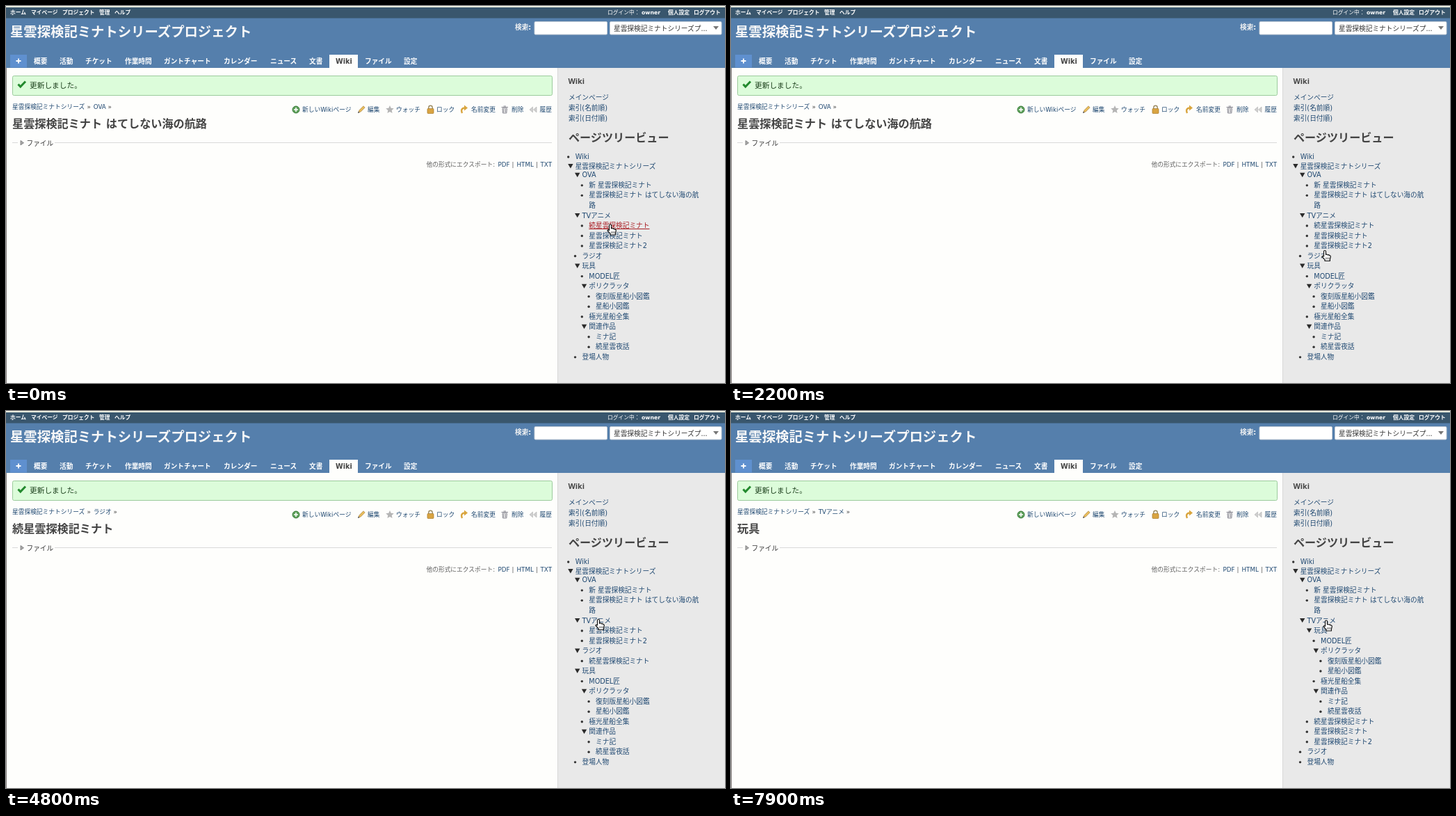
Recreate the animation shown at these times as an HTML page. Size 1034 by 542 pixels, loop 8 s.

```html
<!DOCTYPE html>
<html lang="ja">
<head>
<meta charset="utf-8">
<title>Wiki ページツリー</title>
<style>
html, body { margin: 0; width: 100%; height: 100%; overflow: hidden; background: #fefefc; }
svg { display: block; width: 1034px; height: 542px; }
text { font-family: "DejaVu Sans", "Noto Sans CJK JP", "Noto Sans CJK", sans-serif; white-space: pre; }
</style>
</head>
<body>
<svg id="stage" viewBox="0 0 1034 542"></svg>
<script>
const LOOP = 8000, STEP = 100;
const SERIES = "星雲探検記ミナト";
const SEQUEL = "続" + SERIES;
const LINK = "#1f4871", INK = "#444";
const stage = document.getElementById("stage");

function add(tag, attrs, parent = stage) {
  const node = document.createElementNS("http://www.w3.org/2000/svg", tag);
  for (const key in attrs) node.setAttribute(key, attrs[key]);
  parent.appendChild(node);
  return node;
}
const rect = (x, y, width, height, fill, more) => add("rect", { x, y, width, height, fill, ...more });
const path = (d, more, parent) => add("path", { d, fill: "none", ...more }, parent);

// Places a line of text by its left edge and the visual middle of its glyphs.
function label(x, middle, content, size, fill, more, parent) {
  const node = add("text", { x, y: middle + size * 0.37, "font-size": size, fill, ...more }, parent);
  node.textContent = content;
  return node;
}
const bold = { "font-weight": 700 };

function drawHeader() {
  rect(0, 0, 1034, 2, "#e9ecdf");
  rect(0, 2, 1034, 16, "#39566d");
  rect(0, 17.5, 1034, 71.5, "#557fac");
  const menu = [[6, "ホーム"], [36, "マイページ"], [81, "プロジェクト"], [134, "管理"], [156, "ヘルプ"],
    [914, "owner"], [952, "個人設定"], [989, "ログアウト"]];
  for (const [x, name] of menu) label(x, 9, name, 7.75, "#fff", bold);
  label(865, 9, "ログイン中：", 7.75, "#fff");
  label(6, 37, SERIES + "シリーズプロジェクト", 19.35, "#f8f8f8", bold);

  label(732, 30.5, "検索:", 9.7, "#f4f4f4", bold);
  rect(760, 22.5, 104.5, 18.5, "#fff", { stroke: "#c4cdd6", rx: 1.5 });
  rect(868.5, 22.5, 160.5, 18.5, "#fff", { stroke: "#c4cdd6", rx: 1.5 });
  label(874, 32.5, SERIES + "シリーズプ...", 9.7, "#333");
  path("M1017 29h8l-4 5z", { fill: "#777" });

  rect(6, 70, 24, 18.5, "#5f90cf");
  path("M14.5 79h7M18 75.5v7", { stroke: "#fff", "stroke-width": 1.8 });
  rect(465, 70, 41, 19, "#fefefc");
  const tabs = [[40, "概要"], [77, "活動"], [114, "チケット"], [171, "作業時間"], [227, "ガントチャート"],
    [313, "カレンダー"], [380, "ニュース"], [436, "文書"], [474, "Wiki"], [516, "ファイル"], [572, "設定"]];
  for (const [x, name] of tabs) label(x, 79, name, 9.7, name === "Wiki" ? "#444" : "#fff", bold);
}

function drawIcons() {
  add("circle", { cx: 417, cy: 149, r: 5, fill: "#5da05a", stroke: "#3f7f3f" });
  path("M414 149h6M417 146v6", { stroke: "#fff", "stroke-width": 1.6 });
  path("M507 153l1-3.2 6-6 2.2 2.2-6 6z", { fill: "#e9bd5c", stroke: "#a98545", "stroke-width": .7 });
  path("M506 154l2.5-.8-1.7-1.7z", { fill: "#444" });
  path("M552 143l1.7 3.8 4.1.4-3.1 2.7.9 4.1-3.6-2.1-3.6 2.1.9-4.1-3.1-2.7 4.1-.4z", { fill: "#b5b5b5" });
  path("M607.8 148v-2a2.7 2.7 0 0 1 5.4 0v2", { stroke: "#9a8a60", "stroke-width": 1.4 });
  rect(606, 147.5, 9, 7, "#d9a441", { stroke: "#a87a2a", "stroke-width": .7, rx: 1 });
  path("M656 154q-3-7 4-7.5", { stroke: "#d9a53e", "stroke-width": 2.4 });
  path("M659 142.5l5 4-5 4z", { fill: "#d9a53e" });
  path("M714 147l.6 7h5.2l.6-7zM712.5 145.5h9.5M715.5 144h3.5M716 148v5M718.4 148v5",
    { stroke: "#85858f", "stroke-width": 1 });
  path("M757.5 145v8l-4.5-4zM763 145v8l-4.5-4z", { fill: "#cfcfcf", stroke: "#b0b0b0", "stroke-width": .6 });
}

function drawContent() {
  rect(0, 89, 1, 453, "#85807e");
  rect(9.5, 100.5, 776, 28, "#dcfcda", { stroke: "#9ccb9c", rx: 2 });
  path("M17.5 112.5l3.3 3.5 7.2-7.5", { stroke: "#238a2e", "stroke-width": 3 });
  label(34, 114, "更新しました。", 10.7, "#1d401d");

  label(9, 145, SERIES + "シリーズ", 8.73, LINK);
  label(116.5, 145, "»", 8.73, INK);

  drawIcons();
  const actions = [[426, "新しいWikiページ"], [520, "編集"], [561, "ウォッチ"], [619, "ロック"],
    [669, "名前変更"], [727, "削除"], [767.5, "履歴"]];
  for (const [x, name] of actions) label(x, 149, name, 8.73, LINK);

  path("M9 196.5h8M70 196.5h715", { stroke: "#d9d9d9" });
  path("M21 193.5l4.5 3.2-4.5 3.2z", { fill: "#aaa", stroke: "#777", "stroke-width": .8 });
  label(29.5, 197, "ファイル", 9.7, "#333");

  label(604.5, 228, "他の形式にエクスポート:", 8.73, "#606060");
  for (const x of [727.5, 762]) label(x, 228, "|", 8.73, "#555");
  for (const [x, name] of [[707.5, "PDF"], [734.5, "HTML"], [768.5, "TXT"]]) label(x, 228, name, 8.73, LINK);
}

function drawSidebar() {
  rect(793, 89, 241, 453, "#e9e9e9");
  rect(793, 89, 1, 453, "#d8d8d8");
  label(808.5, 108.5, "Wiki", 10.7, INK, { style: "font-family:'Open Sans',sans-serif;font-weight:700" });
  label(809, 131.5, "メインページ", 9.7, LINK);
  label(809, 146.5, "索引(名前順)", 9.7, LINK);
  label(809, 161, "索引(日付順)", 9.7, LINK);
  label(809, 189.5, "ページツリービュー", 16.1, INK, bold);
}

// A page is either a name or [name, children]; a line break splits a long name.
const toys = ["玩具", [
  "MODEL匠",
  ["ポリクラッタ", ["復刻版星船小図鑑", "星船小図鑑"]],
  "極光星船全集",
  ["関連作品", ["ミナ記", "続星雲夜話"]]
]];
const series = [SERIES, SERIES + "2"];
const wikiTree = (...groups) => ["Wiki", [SERIES + "シリーズ", [
  ["OVA", ["新 " + SERIES, SERIES + " はてしない海の航\n路"]],
  ...groups, "登場人物"
]]];

const rowY = row => row < 2 ? [216.5, 230][row] : 242.8 + 14.53 * (row - 2);

function buildTree(pages) {
  const group = add("g", {});
  const links = {};
  let row = 0;
  const walk = (list, depth) => {
    for (const page of list) {
      const [name, children] = Array.isArray(page) ? page : [page];
      const x = 818.7 + 9.8 * depth, y = rowY(row);
      if (children) path(`M${x - 10.5} ${y - 3}h7.4l-3.7 6.4z`, { fill: "#2b2b2b" }, group);
      else add("circle", { cx: x - 10, cy: y + .5, r: 1.7, fill: "#333" }, group);
      for (const line of name.split("\n")) links[name] = label(x, rowY(row++), line, 9.7, LINK, {}, group);
      if (children) walk(children, depth + 1);
    }
  };
  walk(pages, 0);
  return { group, links };
}

drawHeader();
drawContent();
drawSidebar();

const trees = {
  first: buildTree(wikiTree(["TVアニメ", [SEQUEL, ...series]], "ラジオ", toys)),
  radio: buildTree(wikiTree(["TVアニメ", series], ["ラジオ", [SEQUEL]], toys)),
  nested: buildTree(wikiTree(["TVアニメ", [toys, SEQUEL, ...series]], "ラジオ"))
};
const crumb = label(125.7, 145, "", 8.73, LINK);
const crumbName = add("tspan", {}, crumb);
add("tspan", { fill: INK }, crumb).textContent = " »";
const heading = label(9, 169, "", 16.15, INK, bold);

const ghost = label(0, 0, "", 9.7, "#c5282b", { "text-decoration": "underline", opacity: .85 });
const hand = add("g", {});
path("M-1.5 1a1.5 1.5 0 0 1 3 0V5.5Q3 4.3 4.2 6Q5.7 5 6.5 6.7Q8.2 6.2 8.3 8.3L7.4 12V14.5H0V12.7L-4 8.5Q-3.6 6.4-1.5 8Z",
  { fill: "#fff", stroke: "#111", "stroke-width": 1.2, "stroke-linejoin": "round" }, hand);
path("M1.8 9.5v3M3.8 9.5v3M5.8 9.5v3", { stroke: "#222", "stroke-width": .7 }, hand);
const arrow = add("g", {});
path("M0 0V11.5L2.7 9L4.6 13L6.6 12.1L4.8 8.2H8.3Z",
  { fill: "#111", stroke: "#fff", "stroke-width": .9 }, arrow);
add("circle", { cx: 7.8, cy: 18, r: 7.2, fill: "#27962b", stroke: "#1c7a22", "stroke-width": .8 }, arrow);
path("M3.8 18h8M7.8 14v8", { stroke: "#fff", "stroke-width": 2.2 }, arrow);

const pages = [
  { at: 0, tree: "first", crumb: "OVA", title: SERIES + " はてしない海の航路" },
  { at: 2400, tree: "radio", crumb: "ラジオ", title: SEQUEL },
  { at: 5100, tree: "first", crumb: "TVアニメ", title: SEQUEL },
  { at: 7500, tree: "nested", crumb: "TVアニメ", title: "玩具" }
];
const drags = [
  { hover: 0, from: 600, to: 1700, name: SEQUEL, dx: -27.5, dy: 6.5 },
  { hover: 2600, from: 3600, to: 4600, name: SEQUEL, dx: -16, dy: 5 },
  { hover: 5400, from: 5600, to: 7100, name: "玩具", dx: -9, dy: 2 }
];
const pointer = [[0, 869, 314.5], [500, 869, 314.5], [1300, 851.5, 355], [1700, 854, 352], [3500, 854, 352],
  [4500, 852, 300], [5000, 852, 300], [5500, 837, 371], [6000, 866, 334], [6800, 856.5, 301.5], [8000, 856, 301.5]];

function pointerAt(t) {
  const i = pointer.findIndex(key => key[0] > t);
  const [t0, x0, y0] = pointer[i - 1], [t1, x1, y1] = pointer[i];
  const u = (t - t0) / (t1 - t0), e = u * u * (3 - 2 * u);
  return [x0 + (x1 - x0) * e, y0 + (y1 - y0) * e];
}
const show = (node, visible) => node.setAttribute("visibility", visible ? "visible" : "hidden");

function render(t) {
  const page = pages.filter(p => p.at <= t).pop();
  crumbName.textContent = page.crumb;
  heading.textContent = page.title;
  for (const key in trees) show(trees[key].group, key === page.tree);

  const drag = drags.find(d => t >= d.hover && t < d.to);
  const links = trees[page.tree].links;
  for (const name in links) {
    const active = drag && drag.name === name;
    links[name].setAttribute("fill", active ? "#a91c22" : LINK);
    links[name].setAttribute("text-decoration", active ? "underline" : "none");
  }

  const [x, y] = pointerAt(t);
  const dragging = Boolean(drag && t >= drag.from);
  for (const cursor of [hand, arrow]) cursor.setAttribute("transform", `translate(${x} ${y})`);
  show(hand, !dragging);
  show(arrow, dragging);
  show(ghost, dragging);
  if (dragging) {
    ghost.textContent = drag.name;
    ghost.setAttribute("x", x + drag.dx);
    ghost.setAttribute("y", y + drag.dy + 3.6);
  }
}

const start = performance.now();
function tick() {
  const t = (performance.now() - start) % LOOP;
  render(Math.floor(t / STEP) * STEP);
  requestAnimationFrame(tick);
}
tick();
</script>
</body>
</html>
```
